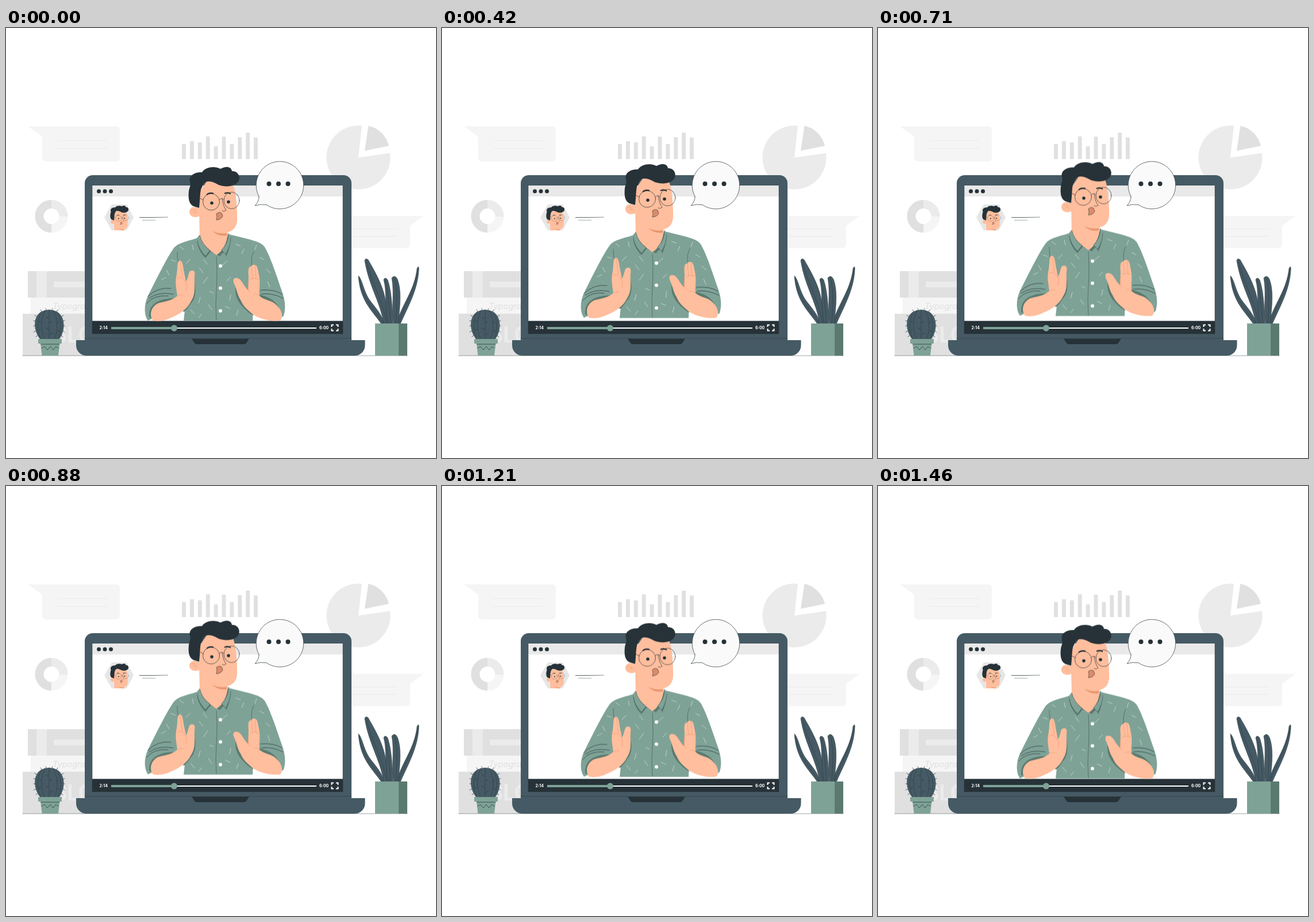
An HTML page without scripts that plays this animation: 748 by 748 pixels, repeating every 1.5 s.

```html
<!DOCTYPE html>
<html lang="en">
<head>
<meta charset="utf-8">
<title>Video lesson</title>
<style>
  html, body { margin: 0; width: 100%; height: 100%; overflow: hidden; background: #fff; }
  svg { display: block; width: 100%; height: 100%; }
  :root { --ink: #263238; --slate: #455a64; --green: #7fa297; --shade: #5b7a6f; --skin: #ffbe9d; --blush: #e8966f; }
  .ink { fill: var(--ink); }
  .slate { fill: var(--slate); }
  .green { fill: var(--green); }
  .shade { fill: var(--shade); }
  .skin { fill: var(--skin); }
  .g1 { fill: #e0e0e0; }
  .g2 { fill: #ebebeb; }
  .g3 { fill: #f5f5f5; }
  .line { fill: none; stroke: var(--ink); stroke-width: .7; stroke-linecap: round; stroke-linejoin: round; }
  .thin { stroke-width: .45; }
  .crease { fill: none; stroke: var(--blush); stroke-width: .6; stroke-linecap: round; }
  .time { font: 700 7px Inter, Roboto, sans-serif; fill: #fff; }
  .speaker { animation: bob 1.5s linear infinite; }
  @keyframes bob { 50% { transform: translateY(-9px); } }
</style>
</head>
<body>
<svg viewBox="0 0 748 748">
  <defs>
    <clipPath id="hexagon"><path d="M171 329.500L184 307H210L222 329.500L210 352H184Z"/></clipPath>
  </defs>

  <!-- Backdrop -->
  <path class="g3" d="M38 171H192A6 6 0 0 1 198 177V226A6 6 0 0 1 192 232H69A6 6 0 0 1 63 226V189Z"/>
  <path d="M89 196H176M89 209.500H176" stroke="#ebebeb"/>
  <path d="M309.500 228V202M323.400 228V197M337.300 228V199M351.200 228V188.500M365.100 228V206M379 228V189M392.900 228V202M406.800 228V190M420.600 228V182M434.400 228V190.500" stroke="#e0e0e0" stroke-width="6.800"/>
  <path class="g2" d="M619 170L613 225.500L668 217.500A55.500 55.500 0 1 1 619 170Z"/>
  <path class="g1" d="M630.500 170L624 213.500L666 205A47 47 0 0 0 630.500 170Z"/>
  <g fill="none" stroke-width="15">
    <path d="M79 306.500a21 21 0 0 0 0 42" stroke="#e0e0e0"/>
    <path d="M79 306.500a21 21 0 0 1 21 22" stroke="#ebebeb"/>
    <path d="M100 328.500a21 21 0 0 1 -21 20" stroke="#f5f5f5"/>
  </g>
  <path class="g3" d="M590 327H726L703 344V377A6 6 0 0 1 697 383H590Z"/>
  <path d="M596 349.500H680M596 362.500H680" stroke="#ebebeb"/>

  <!-- Books -->
  <path class="g1" d="M38 423H145V469H38ZM29 497H145V570H29Z"/>
  <path class="g2" d="M53 423H71V469H53ZM83 441H145V451H83Z"/>
  <path class="g3" d="M43 469H145V497H43Z"/>
  <text x="81" y="489" font-family="Inter, Roboto, sans-serif" font-size="14.500" font-style="italic" fill="#e0e0e0">Typography</text>
  <text x="82" y="547" font-family="Roboto, sans-serif" font-size="38" font-weight="700" fill="#ebebeb">BLOG</text>
  <path class="line thin" d="M29 570H698"/>

  <!-- Cactus -->
  <path class="slate" d="M60 542C47 527 46 502 62 493Q75 487 88 493C104 502 104 527 92 542Z"/>
  <path class="line thin" d="M75 490V541M68 491C60 506 60 527 67 541M82 491C91 506 91 527 84 541M61 495C53 510 54 528 60 540M90 495C97 510 97 528 91 540"/>
  <path class="line" d="M54 502l-4-2M52 510l-4-1M51 518h-3M52 527l-4 2M55 535l-3 2M96 502l4-2M99 510l3-1M100 518h2M99 527l3 2M96 535l3 2M62 493l-2-3M70 490l-1-2M80 490l1-2M88 493l2-3M70 503l3 2M79 511l-3 2M70 522l3 2M80 531l-3 2M58 510l3 2M60 524l-3 2M91 512l-3 2M90 526l3 2"/>
  <path class="green" d="M60 548H93.500L91 570H62.500Z"/>
  <path class="shade" d="M60 549H93.500L93 551H60.500Z"/>
  <rect class="green" x="56" y="541" width="41" height="8" rx="1"/>
  <path class="line" d="M62 557l5-3 5 6 5-6 5 6 5-6 4 3"/>

  <!-- Potted leaves -->
  <g class="slate" stroke="#263238" stroke-width=".5">
    <path d="M653 515C637 491 616 476 613 431C620 437 622 459 634 475C648 493 655 501 658 515Z"/>
    <path d="M657 515C652 478 631 449 624 405Q625 399 630 403C640 421 657 448 661 478Q664 497 667 515Z"/>
    <path d="M679 515C688 481 711 457 715 418Q719 411 718 422C716 457 698 487 686 515Z"/>
    <path d="M665 515C658 485 663 459 657 438Q659 432 664 438C671 459 672 487 673 515Z"/>
    <path d="M674 515C670 487 676 462 671 435Q676 428 681 437C689 458 685 488 682 515Z"/>
  </g>
  <path class="line thin" d="M627 404C633 440 656 474 662 513M614 435C621 472 641 490 655 513M717 420C711 456 692 485 683 513M660 438C665 462 667 487 669 513M676 435C682 460 680 488 678 513"/>
  <path class="green" d="M642 514H683V570H642Z"/>
  <path class="shade" d="M683 514H698V570H683Z"/>

  <!-- Laptop -->
  <path class="slate" d="M137 544V270A14 14 0 0 1 151 256H587A14 14 0 0 1 601 270V544Z"/>
  <path fill="#fff" d="M150 274H586V532H150Z"/>
  <path fill="#e9e9e9" d="M150 274H586V293H150Z"/>
  <path class="line thin" d="M150 274V532H586V274"/>
  <path class="slate" d="M122 543H624.500V552A18 18 0 0 1 606.500 570H140A18 18 0 0 1 122 552Z"/>
  <path class="line thin" d="M137 540H601"/>
  <path class="ink" d="M323 540.500H423L418 548Q417 550 414 550H332Q329 550 328 548Z"/>
  <g class="ink"><circle cx="161.500" cy="284" r="3.500"/><circle cx="172" cy="284" r="3.500"/><circle cx="182.500" cy="284" r="3.500"/></g>

  <!-- Profile -->
  <path fill="#e6e6e6" d="M171 329.500L184 307H210L222 329.500L210 352H184Z"/>
  <g clip-path="url(#hexagon)"><use href="#head" transform="translate(67 222) scale(.36)"/></g>
  <path class="ink" d="M232 329.300L282 328.700V329.300L232 330Z"/>
  <path d="M237 334.300H260" stroke="#90979a" stroke-width=".8"/>

  <!-- Player bar -->
  <path class="ink" d="M150 509.500H586V532H150Z"/>
  <text class="time" x="162.500" y="524.300">2:14</text>
  <text class="time" x="545" y="523.800">6:00</text>
  <path d="M292 522H540" stroke="#fff" stroke-width="2"/>
  <path d="M183 522H292" stroke="#7fa297" stroke-width="4"/>
  <circle class="green" cx="292.500" cy="522" r="5.500"/>
  <path d="M566.500 520V516.500H570M574 516.500H577.500V520M577.500 523V526.500H574M570 526.500H566.500V523" fill="none" stroke="#fff" stroke-width="2"/>

  <!-- Speaker -->
  <g class="speaker">
    <path class="green" d="M336 364C318 371 300 372 291 384C280 400 266 428 246 468C240 482 240 500 247 509L256 505L296 474L312 482L309 509.500H429L430 478L441 468L478 504L483 501C487 487 486 474 479 455C470 428 459 396 450 381C444 372 430 369 388 359Z"/>
    <path d="M302 380l7 5M324 377l2 9M343 402l7 9M287 403l8 3M279 421l5 9M270 438l8-4M321 402l-8 8M336 417l7 9M351 433l-8 11M338 468l-3 11M352 481l6 9M321 490l7 8M341 497l-6 7M385 405l-9 8M399 376l9 3M414 384l-4 9M436 377l-3 9M441 399l8 4M384 440l7-7M391 463l-2 11M381 484l9 4M404 490l-3 10M452 419l8 7M455 441l4 10M354 458l7 3" fill="none" stroke="#d1dfda" stroke-width=".8"/>
    <path class="line thin" d="M298 390Q297 400 301 411M431 389Q425 400 428 414M366 398Q368 430 366 456T366 508"/>
    <path class="line" d="M247 467Q264 450 287 453M249 470Q266 458 291 463M245 479Q257 464 282 466M480 463Q467 454 443 456M482 470Q462 460 444 463"/>
    <path class="shade" d="M249 503Q247 470 296 470V474Q256 474 256 505ZM479 502Q476 471 441 464V468Q472 477 475 503Z"/>
    <path class="shade" d="M327 440Q334 467 321 480Q315 490 309 494L306 488ZM400 447Q396 466 409 482Q419 494 430 500L428 485Z"/>
    <g fill="#fff"><circle cx="373" cy="414" r="3"/><circle cx="373" cy="452.500" r="3"/><circle cx="373" cy="492" r="3"/></g>

    <path class="shade" d="M332 366Q333 387 347 400L356 389L372 397L381 387L383 398Q391 380 391 362Z"/>
    <g id="head">
      <path class="skin" d="M336 318L337 366Q345 381 366 395Q383 384 386 358L380 335Z"/>
      <path fill="#e8966f" d="M357 351Q367 359 384 357V361Q367 363 357 351Z"/>
      <path class="skin" d="M336 314C328 308 318 313 319 321C320 329 330 331 337 327L344 342C354 354 371 359 383 356C398 353 403 343 402 328C402 305 400 284 393 266L351 264L337 285Z"/>
      <path class="ink" d="M336 313L326 310C317 306 317 293 318 284C319 276 322 275 320 268C317 258 327 250 341 251C347 241 364 240 373 245C381 240 392 240 393 249C402 248 408 257 405 265C401 275 384 278 370 273C358 266 345 262 341 277C337 281 338 298 336 313Z"/>
      <path class="crease" d="M323 317Q328 315 331 320M326 322Q328 319 332 322"/>
      <path d="M349 290Q354 285.500 361 288M380 288Q385 285 391 288.500" fill="none" stroke="#263238" stroke-width="2.200"/>
      <circle class="ink" cx="358" cy="304.500" r="2.800"/><circle class="ink" cx="387" cy="302.500" r="2.800"/>
      <g class="line">
        <circle cx="357" cy="302.500" r="14.500"/><ellipse cx="392.500" cy="300" rx="13.500" ry="14.500"/>
        <path d="M371 299Q375 294 379 299M343 299L337 296M376 297Q378 311 383 317Q380 320 376 318"/>
      </g>
      <path d="M366 323Q371 319 375 322L377 327Q375 333 366 334Q368 328 366 323Z" fill="#de8b67" stroke="#263238" stroke-width=".6"/>
    </g>
    <path class="green" d="M337 360Q330 365 333 373Q337 387 347 397L355 387Q341 377 337 360ZM387 357Q392 361 391 369Q389 383 382 394L375 386Q387 374 387 357Z"/>
    <path class="line thin" d="M337 360Q341 377 355 387L347 397Q334 384 333 370M387 357Q387 374 375 386L382 394Q391 378 391 365"/>

    <path class="skin" d="M256 509C249 501 251 486 264 479C276 475 286 476 298 466C297 456 294 446 296 433C299 421 297 408 301 405C306 402 308 412 309 421L313 441C317 436 317 426 320 423Q328 419 328.500 428C326 443 332 461 322 475C316 488 303 498 287 504C275 510 263 511 256 509Z"/>
    <path class="crease" d="M303 406L307 433M298 435Q306 431 312 441Q316 448 313 456M299 466Q305 462 308 465"/>
    <path class="skin" d="M477 509C484 501 479 488 467 479C459 473 449 474 441 466C440 457 443 442 440 430C438 418 437 412 432 412Q428 411 427 415C421 414 421 422 422 433L421 456C416 452 410 439 405 436C398 433 394 436 396 443C401 452 402 464 408 473C414 487 421 490 429 498C444 508 465 511 477 509Z"/>
    <path class="crease" d="M427 416L429 436M433 413L435 437M422 441Q419 456 425 460M439 437Q432 433 425 438M441 466Q436 461 431 464"/>
  </g>

  <!-- Speech bubble -->
  <path class="line" style="fill:#fafafa" d="M440 293A41.300 41.300 0 1 1 453 307.500Q442 306 433 309Q440 302 440 293Z"/>
  <g class="ink"><circle cx="457.500" cy="271" r="4"/><circle cx="474" cy="271" r="4"/><circle cx="490.500" cy="271" r="4"/></g>
</svg>
</body>
</html>
```
